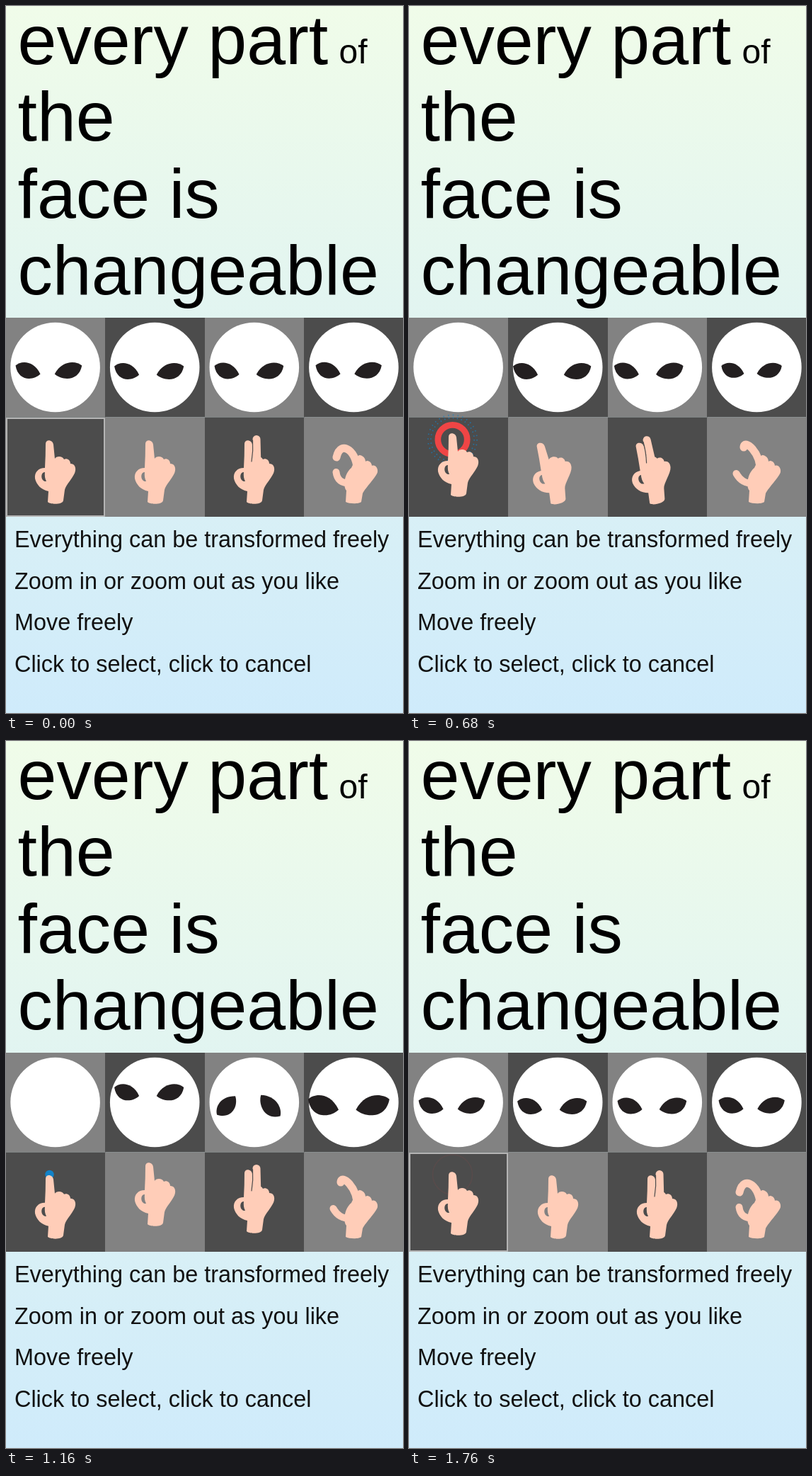
Recreate the animation shown at these times as an HTML page with a canvas. Size 561 by 998 pixels, loop 1800 ms.

```html
<!DOCTYPE html>
<html lang="en">
<head>
<meta charset="utf-8">
<style>
  html, body { margin: 0; height: 100%; overflow: hidden; }
  canvas { display: block; }
</style>
</head>
<body>
<canvas width="561" height="998"></canvas>
<script>
const ctx = document.querySelector('canvas').getContext('2d');
const FONT = '"Liberation Sans", Arial, sans-serif';
const LIGHT = '#828282', DARK = '#4c4c4c', SKIN = '#ffcdb8', RED = '#ef4545', BLUE = '#1182c8';
const LOOP = 1800, STEP = 40, TAP_PERIOD = 720;

const eyeShape = new Path2D('M-17.5-7C-10-14 8-15 17.5 5C7 15-14 15-17.5-7Z');
const fist = new Path2D(
  'M55 72Q56 55 56 38C56 31 66 32 67 39L69 59C71 55 80 55 82 60C86 58 91 61 91 66' +
  'C96 66 99 70 98 76C97 84 84 96 83 103L81 118C80 124 63 124 59 120L60 105' +
  'C50 103 43 96 41 87C40 78 46 72 55 72ZM55 78C48 78 49 92 57 91Q54 85 55 78Z');
const pinchPalm = new Path2D(
  'M67 72C73 60 75 54 79 54C85 55 87 60 87 63C91 60 96 65 96 69C101 67 105 73 104 78' +
  'C102 85 87 100 83 108L81 120C78 123 64 123 59 120L60 104C55 98 57 80 67 72Z');

// Motion helpers: progress, smooth step, one half or full sine, rise-and-fall.
const progress = (t, from, to) => Math.min(1, Math.max(0, (t - from) / (to - from)));
const ramp = (t, from, to) => {
  const p = progress(t, from, to);
  return p * p * (3 - 2 * p);
};
const bump = (t, from, to) => Math.sin(Math.PI * progress(t, from, to));
const wave = (t, from, to) => Math.sin(2 * Math.PI * progress(t, from, to));
const hold = (t, a, b, c, d) => ramp(t, a, b) - ramp(t, c, d);

function at(x, y, degrees, draw) {
  ctx.save();
  ctx.translate(x, y);
  ctx.rotate(degrees * Math.PI / 180);
  draw();
  ctx.restore();
}

function text(string, x, y, size) {
  ctx.font = `${size}px ${FONT}`;
  ctx.fillText(string, x, y);
}

function circle(x, y, r) {
  ctx.beginPath();
  ctx.arc(x, y, r, 0, Math.PI * 2);
}

function line(color, width, path) {
  ctx.strokeStyle = color;
  ctx.lineWidth = width;
  ctx.stroke(new Path2D(path));
}

function eyes(x, y, gap, turn = 0, scale = 1) {
  ctx.fillStyle = '#231f20';
  for (const side of [1, -1])
    at(x - gap * side, y, -turn * side, () => {
      // The right eye is a little longer.
      ctx.scale((side > 0 ? 1 : -1.1) * scale, scale);
      ctx.fill(eyeShape);
    });
}

function hand(x, lift, tilt = 0, twoFingers = false) {
  // Tilts around the wrist.
  at(x + 70, 700 + lift, tilt, () => {
    ctx.translate(-70, -120);
    ctx.fillStyle = SKIN;
    ctx.fill(fist, 'evenodd');
    if (twoFingers) {
      line(SKIN, 11, 'M73 31.5L74 70');
      line(DARK, 1.2, 'M67.5 33Q68.5 48 66 63');
    }
  });
}

function pinchHand(open) {
  at(421, 580, 0, () => {
    line(SKIN, 11, `M75 78C77 50 52 30 ${46 + 6 * open} ${57 - 14 * open}`);
    line(SKIN, 10, `M66 94C54 94 47 90 ${45.5 - 4 * open} ${78 + 2 * open}`);
    ctx.fillStyle = SKIN;
    ctx.fill(pinchPalm);
  });
}

function ripple(t) {
  if (t < 0) return;
  const x = 61.5, y = 612;
  ctx.save();
  ctx.globalAlpha = 1 - ramp(t, 240, 330);
  ctx.fillStyle = BLUE;
  circle(x, y, 2 + t * .03);
  ctx.fill();

  ctx.globalAlpha = .7 * hold(t, 260, 320, 360, 500);
  ctx.strokeStyle = BLUE;
  ctx.lineCap = 'butt';
  ctx.lineWidth = 1.8;
  const spread = 27 + t * .02;
  for (const r of [spread, spread - 4]) {
    ctx.setLineDash([1.5, r * Math.PI / 16 - 1.5]);
    circle(x, y, r);
    ctx.stroke();
  }
  ctx.setLineDash([]);

  if (t > 200) {
    ctx.globalAlpha = 1 - ramp(t, 540, 780);
    ctx.strokeStyle = RED;
    ctx.lineWidth = 10 - 8.5 * ramp(t, 320, 560);
    circle(x, y, 28 * Math.sin(progress(t, 200, 540) * Math.PI / 2));
    ctx.stroke();
  }
  ctx.restore();
}

function backdrop() {
  const sky = ctx.createLinearGradient(0, 0, 0, 998);
  sky.addColorStop(0, '#f0fce9');
  sky.addColorStop(1, '#cfebfb');
  ctx.fillStyle = sky;
  ctx.fillRect(0, 0, 561, 998);

  ctx.fillStyle = '#000';
  ['every part', 'the', 'face is', 'changeable'].forEach((s, i) => text(s, 16.5, 82 + i * 108.3, 98.7));
  text('of', 470.5, 80.5, 48);
  ctx.fillStyle = '#111';
  ['Everything can be transformed freely', 'Zoom in or zoom out as you like',
    'Move freely', 'Click to select, click to cancel']
    .forEach((s, i) => text(s, 12, 764 + i * 58.7, 32.4));

  for (let i = 0; i < 4; i++) {
    const x = Math.round(i * 140.3);
    ctx.fillStyle = i % 2 ? DARK : LIGHT;
    ctx.fillRect(x, 440, 141, 140.5);
    ctx.fillStyle = i % 2 ? LIGHT : DARK;
    ctx.fillRect(x, 580.5, 141, 140.5);
    ctx.fillStyle = '#fff';
    circle(69.6 + i * 140.6, 510, 63.3);
    ctx.fill();
  }
}

function tapColumn(t) {
  if (t < 600 || t >= 1320) {
    ctx.strokeStyle = '#b4b4b4';
    ctx.lineWidth = 2;
    ctx.strokeRect(1, 582, 138, 138);
  }
  if (t < 640 || t >= 1480) eyes(59.5, 514.5, 28.5);
  let lift = 0;
  for (const since of [t - 300, t - 300 - TAP_PERIOD]) {
    ripple(since);
    lift -= 10 * hold(since, 160, 340, 600, 880);
  }
  hand(0, lift);
}

function dragColumns(t) {
  const tilt = 11.8 * wave(t, 120, 840);
  const lift = bump(t, 840, 1400);
  const follow = bump(t, 900, 1460);

  eyes(201.3, 515.5 - 19.7 * follow, 30.7 - 7.5 * wave(t, 160, 960));
  hand(141, -18.5 * lift, tilt);

  const shift = 20 * wave(t, 160, 840) * (1 - progress(t, 160, 840));
  eyes(342.5 + shift, 515, 30.5, 65 * follow);
  hand(281, -8.3 * lift, tilt, true);
}

function pinchColumn(t) {
  const zoom = 1 + .28 * ramp(t, 400, 600) - .73 * ramp(t, 600, 760)
    + .68 * ramp(t, 880, 1120) - .23 * ramp(t, 1420, 1620);
  eyes(483.3, 514.3, 28.3 * zoom, 0, zoom);
  pinchHand(hold(t, 400, 520, 690, 800) + hold(t, 900, 1060, 1420, 1600));
}

function render(now) {
  const t = Math.floor(now % LOOP / STEP) * STEP;
  backdrop();
  ctx.lineCap = 'round';
  tapColumn(t);
  dragColumns(t);
  pinchColumn(t);
}

const start = performance.now();
function tick() {
  render(performance.now() - start);
  requestAnimationFrame(tick);
}
tick();
</script>
</body>
</html>
```
